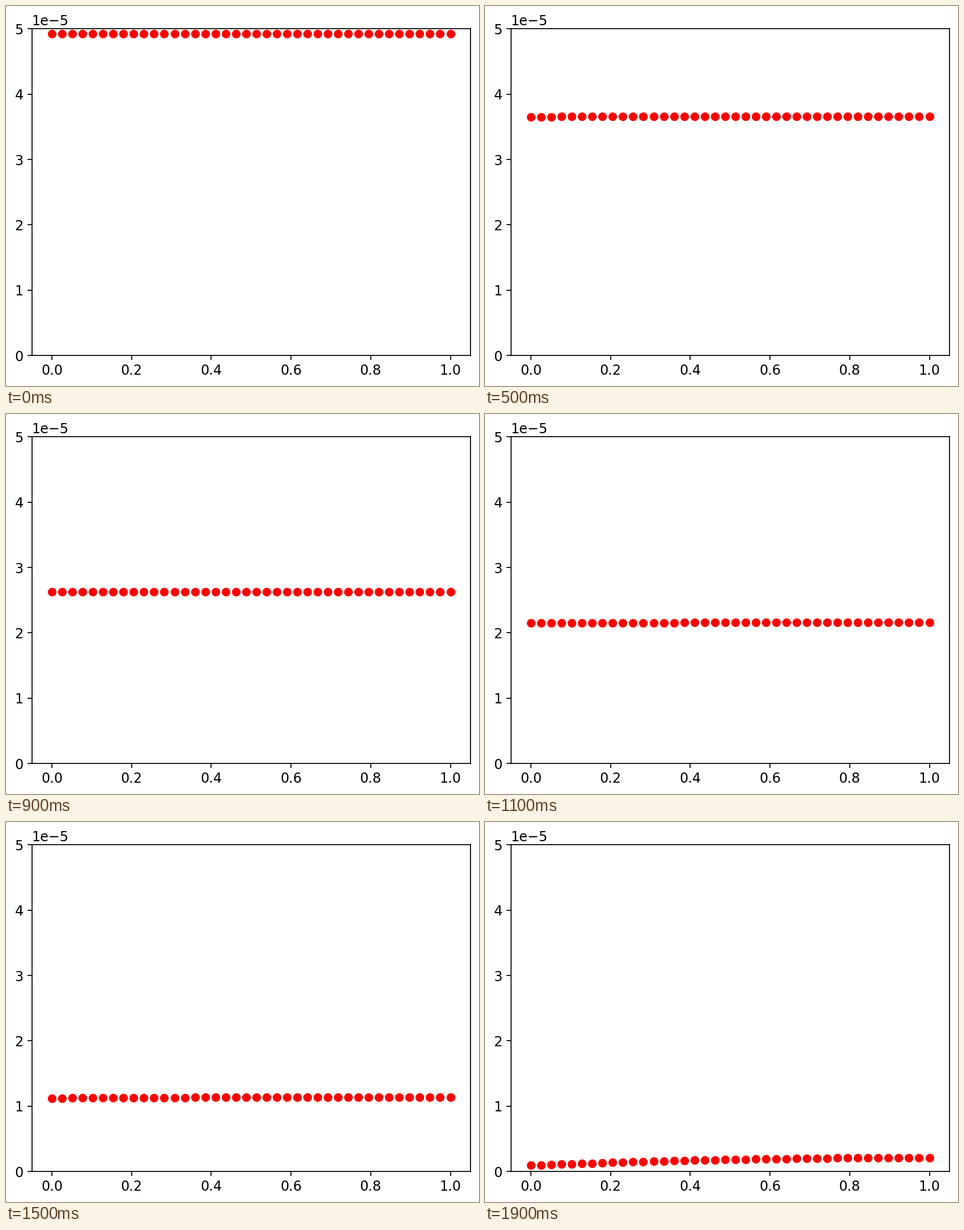
Animation, 835 px wide and 671 px high, one loop 2000 ms. Source, as a matplotlib script:

```python
import numpy as np
import matplotlib.pyplot as plt
from matplotlib.animation import FuncAnimation

W, H, DPI = 835, 671, 156
FRAMES, INTERVAL = 20, 100
UNIT = 1e-5

plt.rcParams.update({"font.family": "DejaVu Sans", "font.size": 11})

# the tiny margin guards against truncation of the pixel size
fig = plt.figure(figsize=((W + 1e-6) / DPI, (H + 1e-6) / DPI), dpi=DPI,
                 facecolor="white")
ax = fig.add_axes([45.9 / W, 54 / H, 773.8 / W, 576.6 / H])
ax.set_xlim(-0.05, 1.05)
ax.set_ylim(0, 5 * UNIT)

x = np.linspace(0, 1, 40)
dots, = ax.plot(x, np.zeros_like(x), "ro")


def profile(step):
    """Steady depletion at x = 0, with a gradient that grows near empty."""
    low = 4.9215 - 0.07917 * step
    rise = 0.03 * (1 / (low + 0.15) - 1 / 5.15)
    return (low + rise * x * (2 - x)) * UNIT


def update(i):
    # each frame shows the nearest whole solver step
    dots.set_ydata(profile(round(3.2 * i)))
    return dots,


anim = FuncAnimation(fig, update, frames=FRAMES, interval=INTERVAL,
                     init_func=lambda: update(0), repeat=True,
                     repeat_delay=0, blit=False)
plt.show()
```
